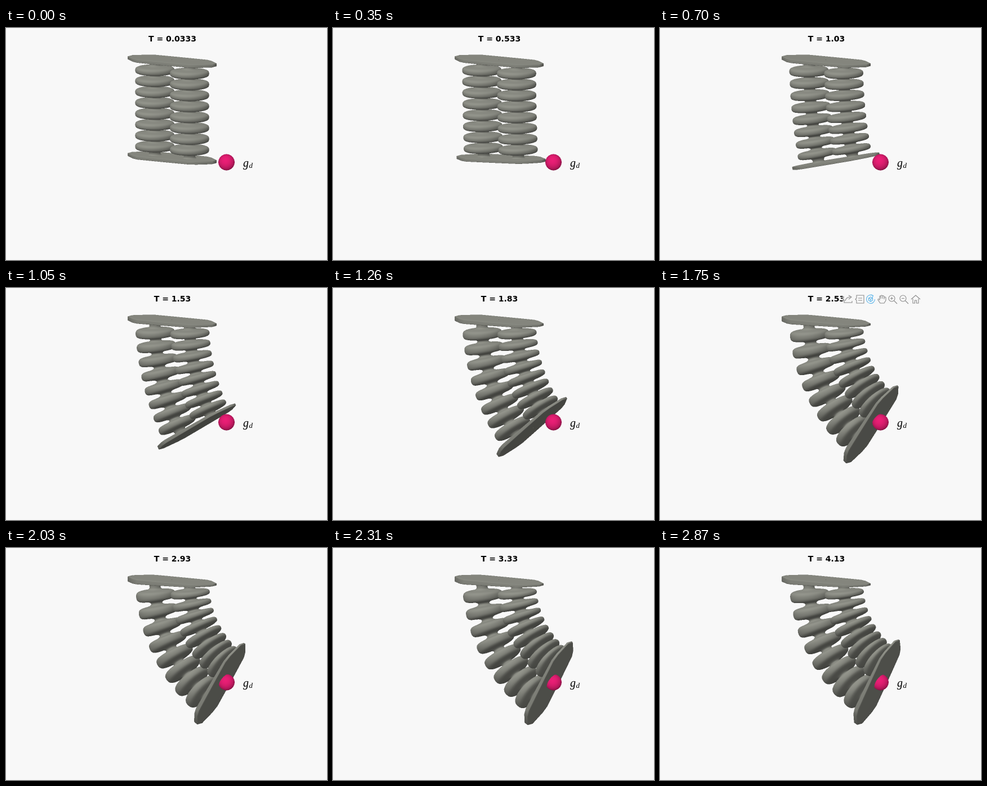
Write an HTML page with a canvas that moves like this. It is 570 px wide and 413 px high and loops after 2.94 s.

```html
<!DOCTYPE html>
<html lang="en">
<head>
<meta charset="utf-8">
<title>Soft bellows reaching a goal</title>
<style>
html, body { margin: 0; width: 100%; height: 100%; overflow: hidden; background: #f8f8f8; }
canvas { display: block; }
</style>
</head>
<body>
<canvas id="stage" width="570" height="413"></canvas>
<script>
const ctx = document.getElementById('stage').getContext('2d');
const STEP = 70, COUNT = 42;

// Camera (orthographic) and the centre of the fixed plate
const AZ = Math.atan(0.604), EL = Math.asin(0.161);
const ca = Math.cos(AZ), sa = Math.sin(AZ), ce = Math.cos(EL), se = Math.sin(EL);
const CX = 295, CY = 56.3;
const LIGHT = [-0.3, -0.65, 0.7];

// Body at rest
const LENGTH = 180.5, PLATE = 6, PITCH = 19.66, FIRST = 22, COLUMN = 36;
const SAG = 16;
const GOAL = { x: 391.5, y: 239, depth: 29, r: 14.4 };

// Supersampled drawing area
const SS = 2, X0 = 208, Y0 = 40, W = 224 * SS, H = 284 * SS;
const layer = document.createElement('canvas');
layer.width = W;
layer.height = H;
const layerCtx = layer.getContext('2d');
const image = layerCtx.createImageData(W, H);
const pixels = image.data;
const zbuf = new Float32Array(W * H);

// Bend angle and arc length over simulated time
const TIME = [0.033, 0.53, 1.03, 1.53, 2.13, 2.53, 3.33, 4.13];
const BEND = [0, 0.045, 0.225, 0.538, 0.8585, 0.9736, 1.0745, 1.108];
const ARC = [180.5, 181.5, 185.5, 200, 211.5, 214.5, 218.8, 219];

function curve(values, t) {
  const last = TIME.length - 1;
  const slope = i => i === 0 || i === last ? 0
    : (values[i + 1] - values[i - 1]) / (TIME[i + 1] - TIME[i - 1]);
  let i = 0;
  while (i < last - 1 && t > TIME[i + 1]) i++;
  const h = TIME[i + 1] - TIME[i];
  const u = Math.min(1, Math.max(0, (t - TIME[i]) / h)), v = 1 - u;
  return v * v * (1 + 2 * u) * values[i] + u * u * (3 - 2 * u) * values[i + 1]
    + h * u * v * (v * slope(i) - u * slope(i + 1));
}

// A mesh is a stack of equally long rings of [x, y, d]; d runs along the body
function loft(rings) {
  return { rows: rings.length, cols: rings[0].length, rest: rings.flat() };
}

function column(offset) {
  const half = [[0, 35], [1.7, 34.8], [3.3, 34.2], [4.6, 32.8], [5.6, 30.3], [6.2, 27],
    [6.8, 20], [7.4, 14.5], [8.4, 11.2], [PITCH / 2, 9.8]];
  const neck = [[5, 14], [6.5, 11.5], [8.5, 9.9]];
  const profile = neck.slice();
  for (let i = 0; i < 8; i++) {
    const mid = FIRST + i * PITCH;
    half.slice().reverse().forEach(([d, r]) => profile.push([mid - d, r]));
    half.slice(1, -1).forEach(([d, r]) => profile.push([mid + d, r]));
  }
  neck.reverse().forEach(([d, r]) => profile.push([LENGTH - d, r]));
  const n = 48;
  return loft(profile.map(([d, r]) => Array.from({ length: n }, (_, i) => {
    const a = i / n * 2 * Math.PI;
    return [offset + r * Math.cos(a), r * Math.sin(a), d];
  })));
}

function plate(start) {
  const corner = [[88, 7.5], [67, 26], [54, 32], [18, 32.5]];
  const back = corner.slice().reverse();
  const outline = [
    ...corner,
    ...back.map(([x, y]) => [-x, y]),
    ...corner.map(([x, y]) => [-x, -y]),
    ...back.map(([x, y]) => [x, -y])
  ];
  const section = [[0, 0.01], [0, 0.5], [0, 0.92], [0.2, 0.99], [0.8, 1]];
  const rings = section.concat(section.slice().reverse().map(([d, k]) => [PLATE - d, k]));
  return loft(rings.map(([d, k]) => outline.map(([x, y]) => [x * k, y * k, start + d])));
}

const meshes = [plate(0), plate(LENGTH - PLATE), column(-COLUMN), column(COLUMN)];

function deform(mesh, bend, arc) {
  const radius = arc / bend;
  const sag = SAG / LENGTH * (1 - Math.exp(-10 * bend));
  return mesh.rest.map(([x, y, d]) => {
    const u = d / LENGTH;
    const phi = bend * (u + sag * u * u * (1 - u));
    const px = radius - (radius - x) * Math.cos(phi);
    const pz = (radius - x) * Math.sin(phi);
    const near = sa * px + ca * y;
    return [CX + ca * px - sa * y, CY + se * near + ce * pz, ce * near - se * pz];
  });
}

function halfLambert(nx, ny, nz) {
  const len = Math.hypot(nx, ny, nz) || 1;
  return 0.5 + 0.5 * (nx * LIGHT[0] + ny * LIGHT[1] + nz * LIGHT[2]) / len;
}

function eachQuad({ rows, cols }, visit) {
  for (let r = 0; r < rows - 1; r++) {
    for (let c = 0; c < cols; c++) {
      const a = r * cols + c, b = r * cols + (c + 1) % cols;
      visit(a, b, b + cols, a + cols);
    }
  }
}

function shades(mesh, pts) {
  const normals = pts.map(() => [0, 0, 0]);
  eachQuad(mesh, (...q) => {
    const [A, B, C, D] = q.map(i => pts[i]);
    const u = [C[0] - A[0], C[1] - A[1], C[2] - A[2]];
    const v = [B[0] - D[0], B[1] - D[1], B[2] - D[2]];
    const n = [u[1] * v[2] - u[2] * v[1], u[2] * v[0] - u[0] * v[2], u[0] * v[1] - u[1] * v[0]];
    for (const i of q) for (let k = 0; k < 3; k++) normals[i][k] += n[k];
  });
  return normals.map(n => 58 + 90 * Math.max(0, halfLambert(...n)) ** 1.5);
}

function put(x, y, depth, r, g, b) {
  const i = y * W + x;
  if (depth <= zbuf[i]) return;
  zbuf[i] = depth;
  pixels[4 * i] = r;
  pixels[4 * i + 1] = g;
  pixels[4 * i + 2] = b;
  pixels[4 * i + 3] = 255;
}

function triangle(A, B, C, la, lb, lc) {
  const ax = (A[0] - X0) * SS - 0.5, ay = (A[1] - Y0) * SS - 0.5;
  const bx = (B[0] - X0) * SS - 0.5, by = (B[1] - Y0) * SS - 0.5;
  const cx = (C[0] - X0) * SS - 0.5, cy = (C[1] - Y0) * SS - 0.5;
  const area = (bx - ax) * (cy - ay) - (by - ay) * (cx - ax);
  if (Math.abs(area) < 1e-6) return;
  const x1 = Math.max(0, Math.ceil(Math.min(ax, bx, cx)));
  const x2 = Math.min(W - 1, Math.floor(Math.max(ax, bx, cx)));
  const y1 = Math.max(0, Math.ceil(Math.min(ay, by, cy)));
  const y2 = Math.min(H - 1, Math.floor(Math.max(ay, by, cy)));
  for (let y = y1; y <= y2; y++) {
    for (let x = x1; x <= x2; x++) {
      const v = ((x - ax) * (cy - ay) - (y - ay) * (cx - ax)) / area;
      const w = ((bx - ax) * (y - ay) - (by - ay) * (x - ax)) / area;
      const u = 1 - v - w;
      if (u < -1e-6 || v < -1e-6 || w < -1e-6) continue;
      const lum = u * la + v * lb + w * lc;
      put(x, y, u * A[2] + v * B[2] + w * C[2], lum, lum * 1.01, lum * 0.95);
    }
  }
}

function ball({ x, y, depth, r }) {
  const bx = (x - X0) * SS, by = (y - Y0) * SS, br = r * SS;
  for (let py = Math.floor(by - br); py <= by + br; py++) {
    for (let px = Math.floor(bx - br); px <= bx + br; px++) {
      const nx = (px + 0.5 - bx) / br, ny = (py + 0.5 - by) / br, q = 1 - nx * nx - ny * ny;
      if (q < 0) continue;
      const nz = Math.sqrt(q);
      const k = 0.42 + 0.36 * halfLambert(nx, ny, nz) + 0.25 * nz;
      put(px, py, depth + nz * r, 235 * k, 31 * k, 118 * k);
    }
  }
}

function drawModel(t) {
  const bend = Math.max(1e-4, curve(BEND, t)), arc = curve(ARC, t);
  zbuf.fill(-1e9);
  pixels.fill(0);
  for (const mesh of meshes) {
    const pts = deform(mesh, bend, arc), lum = shades(mesh, pts);
    eachQuad(mesh, (a, b, c, d) => {
      triangle(pts[a], pts[b], pts[c], lum[a], lum[b], lum[c]);
      triangle(pts[a], pts[c], pts[d], lum[a], lum[c], lum[d]);
    });
  }
  ball(GOAL);
  layerCtx.putImageData(image, 0, 0);
  ctx.imageSmoothingQuality = 'high';
  ctx.drawImage(layer, X0, Y0, W / SS, H / SS);
}

function text(str, x, y, font, align) {
  ctx.font = font;
  ctx.textAlign = align;
  ctx.fillStyle = '#000';
  ctx.fillText(str, x, y);
}

const LENS = 'M4 -1.5A5.5 5.5 0 1 1 -7 -1.5A5.5 5.5 0 1 1 4 -1.5M2.5 2.5L8 8M-4 -1.5H1';
const ICONS = [
  [334, 'M-7 1V6H7V3M-5 3C-4 -2 -1 -4 4 -4M1 -7L6 -4L1 0'],
  [355, 'M-6 -7H7V7H-6V2L-8 0L-6 -2ZM-3 -2H4M-3 2H4'],
  [374, 'M7.5 0A7.5 7.5 0 1 1 4 -6.4M1 -8L4.5 -6.4L3 -3M0 -4L3.5 -2V2L0 4L-3.5 2V-2ZM-3.5 -2L0 0L3.5 -2M0 0V4'],
  [394, 'M-3 7L-7 1Q-7 -2 -4 1V-5Q-3 -7 -2 -5V-1V-6Q-.5 -8 1 -6V-1V-6Q2.5 -7 4 -5V0V-3Q6 -5 7 -3V2L4 7Z'],
  [413, LENS + 'M-1.5 -4V1'],
  [433, LENS],
  [454, 'M-8 0L0 -7L8 0M-5 -1V7H-1.5V2H1.5V7H5V-1']
].map(([x, d]) => [x, new Path2D(d)]);

function toolbar() {
  ctx.fillStyle = 'rgba(248,248,248,0.65)';
  ctx.fillRect(324, 11, 140, 18);
  ctx.lineWidth = 1.1;
  for (const [x, path] of ICONS) {
    ctx.save();
    ctx.translate(x, 20);
    ctx.strokeStyle = x === 374 ? '#5bb4ea' : '#8c8c8c';
    ctx.stroke(path);
    ctx.restore();
  }
}

function draw(index) {
  const t = 1 / 30 + index / 10;
  ctx.fillStyle = '#f8f8f8';
  ctx.fillRect(0, 0, 570, 413);
  drawModel(t);
  text('T = ' + Number(t.toPrecision(3)), 295.5, 24, 'bold 14px "DejaVu Sans", sans-serif', 'center');
  text('g', 421, 247, 'italic 20px "Liberation Serif", serif', 'left');
  text('d', 431.5, 249, 'italic 13px "Liberation Serif", serif', 'left');
  if (index >= 23 && index < 28) toolbar();
}

let shown = -1;
function tick() {
  const index = Math.floor(performance.now() / STEP) % COUNT;
  if (index !== shown) draw(shown = index);
  requestAnimationFrame(tick);
}
tick();
</script>
</body>
</html>
```
